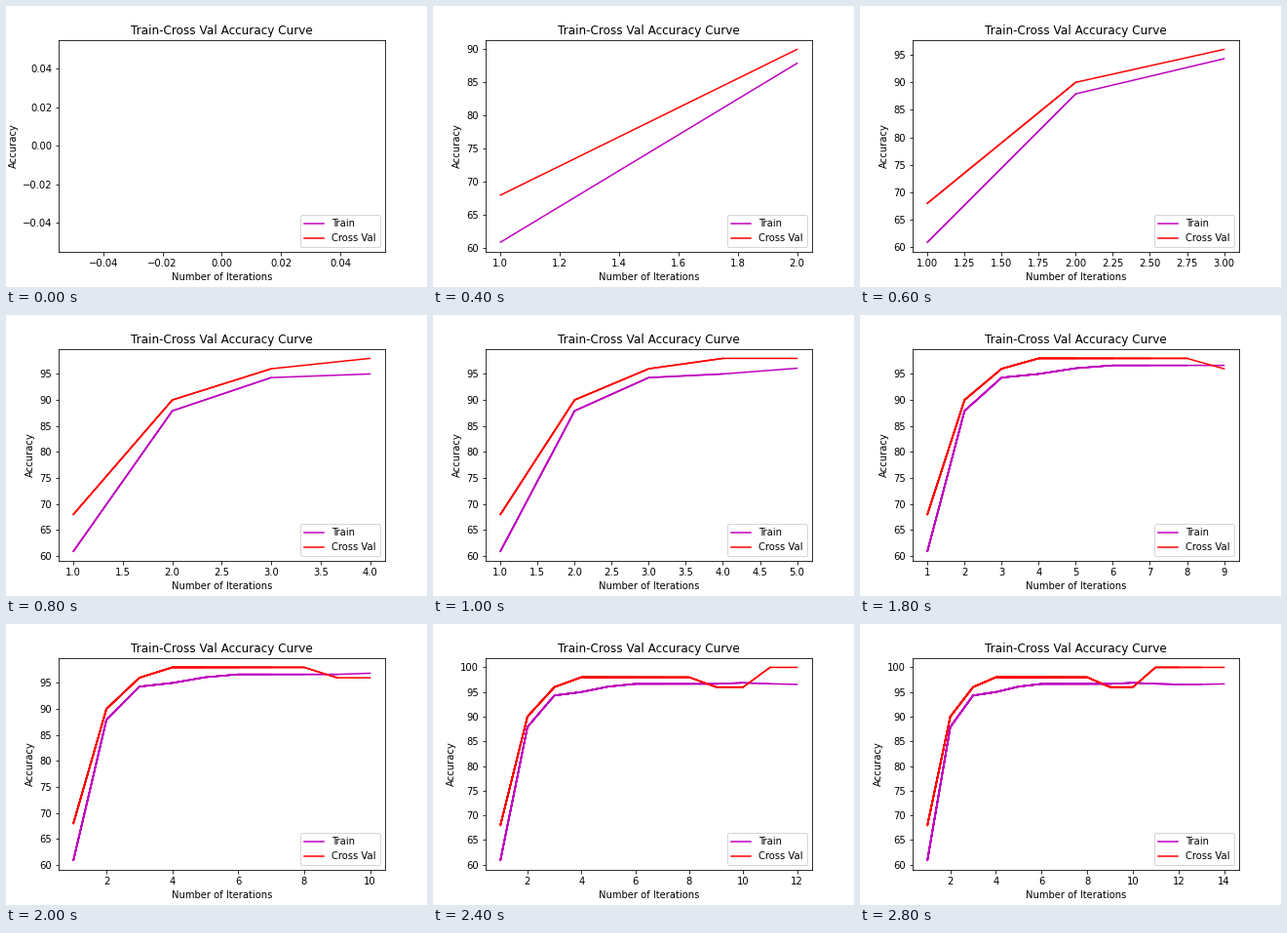
Recreate the animation shown at these times as a matplotlib script. Size 432 by 288 pixels, loop 3000 ms.

```python
import matplotlib.pyplot as plt
from matplotlib.animation import FuncAnimation

plt.rcParams.update({"font.family": "DejaVu Sans", "font.size": 10})

STEPS = 14
TRAIN = [60.9, 87.9, 94.3, 95.0, 96.1, 96.65, 96.65,
         96.65, 96.65, 96.87, 96.67, 96.55, 96.55, 96.65]
CROSS_VAL = [68, 90, 96] + [98] * 5 + [96] * 2 + [100] * 4
ITERATIONS = list(range(1, STEPS + 1))

fig, ax = plt.subplots(figsize=(6, 4), dpi=72, facecolor="white")
fig.subplots_adjust(left=0.125, right=0.9, bottom=0.125, top=0.88)


def draw(count):
    ax.clear()
    # Every step is drawn over the earlier ones, so older segments look heavier.
    for n in range(count + 1):
        last = n == count
        ax.plot(ITERATIONS[:n], TRAIN[:n], color="m", lw=1.5,
                label="Train" if last else None)
        ax.plot(ITERATIONS[:n], CROSS_VAL[:n], color="r", lw=1.5,
                label="Cross Val" if last else None)
    ax.set_title("Train-Cross Val Accuracy Curve")
    ax.set_xlabel("Number of Iterations")
    ax.set_ylabel("Accuracy")
    ax.legend(loc="lower right")
    return ax.get_children()


anim = FuncAnimation(fig, draw, frames=STEPS + 1, interval=200,
                     init_func=lambda: draw(0), repeat=True, repeat_delay=0)
plt.show()
```
